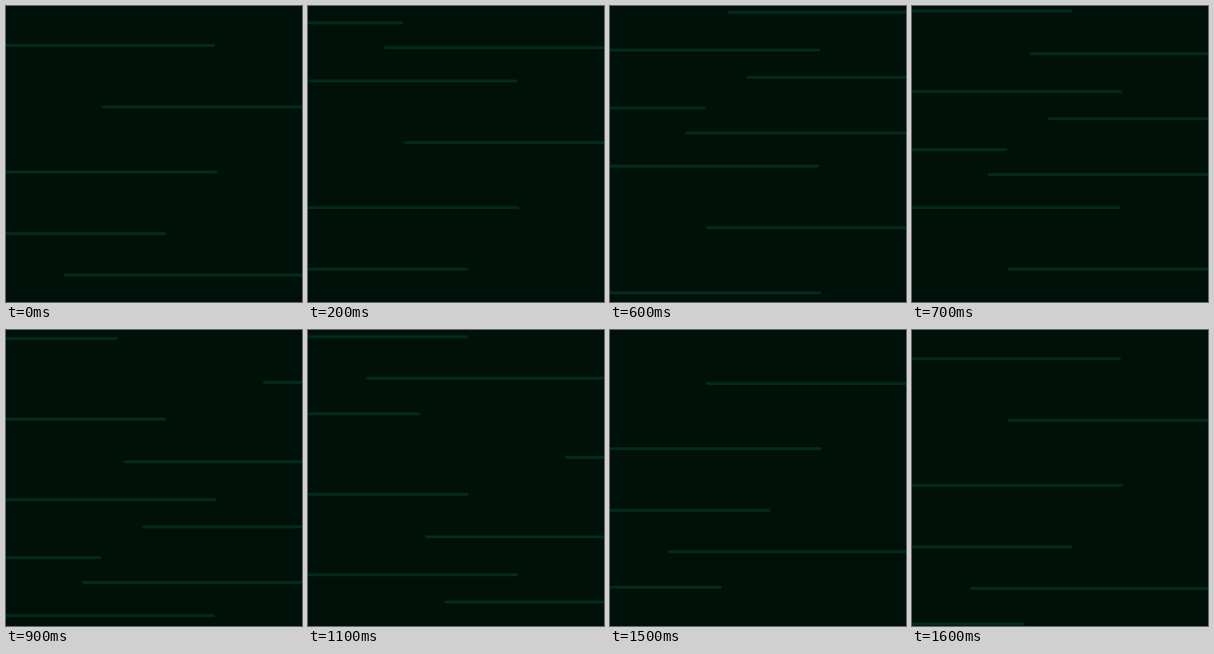
Recreate the animation shown at these times as an HTML page. Size 500 by 500 pixels, loop 1.7 s.

```html
<!DOCTYPE html>
<html lang="en">
<head>
<meta charset="utf-8">
<title>Scrolling lines</title>
<style>
  html, body { margin: 0; width: 100%; height: 100%; overflow: hidden; background: #001109; }
  svg { display: block; width: 100vw; height: 100vh; }
</style>
</head>
<body>
<svg viewBox="0 0 500 500">
  <rect width="500" height="500" fill="#001109"/>
  <g id="scroll" fill="#022a1b">
    <g id="upper"></g>
    <g id="lower"></g>
  </g>
</svg>
<script>
  const SIZE = 500, PERIOD = 916, STEP = 100, STEPS = 17, WEIGHT = 5, BLEED = 10;

  // Top and free end of each line; they hang from the left and right edge in turn.
  const LINES = [
    [382, 271], [452, 98], [512, 189], [586, 434], [648, 271], [720, 198], [784, 355],
    [830, 230], [882, 161], [924, 128], [64, 353], [168, 162], [278, 357]
  ];

  // Step and distance where the scroll changes speed.
  const KEYS = [
    [0, 0], [3, 90], [4, 142], [6, 204], [9, 416], [11, 543], [13, 693], [14, 775], [16, 898]
  ];

  const [scroll, upper, lower] = ['scroll', 'upper', 'lower'].map(id => document.getElementById(id));

  function addLines(group, shift) {
    LINES.forEach(([y, end], i) => {
      const fromLeft = i % 2 === 0;
      const bar = document.createElementNS('http://www.w3.org/2000/svg', 'rect');
      const attrs = {
        x: fromLeft ? -BLEED : end,
        y: y + shift,
        width: BLEED + (fromLeft ? end : SIZE - end),
        height: WEIGHT,
        rx: WEIGHT / 2
      };
      for (const name in attrs) bar.setAttribute(name, attrs[name]);
      group.append(bar);
    });
  }

  function distance(step) {
    const next = Math.max(1, KEYS.findIndex(([s]) => s >= step));
    const [s0, d0] = KEYS[next - 1];
    const [s1, d1] = KEYS[next];
    return Math.floor(d0 + (d1 - d0) * (step - s0) / (s1 - s0));
  }

  function draw(time) {
    const step = Math.floor(time / STEP) % STEPS;
    scroll.setAttribute('transform', `translate(0 ${distance(step)})`);
    // The following set only enters once scrolling has begun.
    upper.setAttribute('visibility', step ? 'visible' : 'hidden');
  }

  addLines(upper, -PERIOD);
  addLines(lower, 0);

  const start = performance.now();
  function tick() {
    draw(performance.now() - start);
    requestAnimationFrame(tick);
  }
  tick();
</script>
</body>
</html>
```
